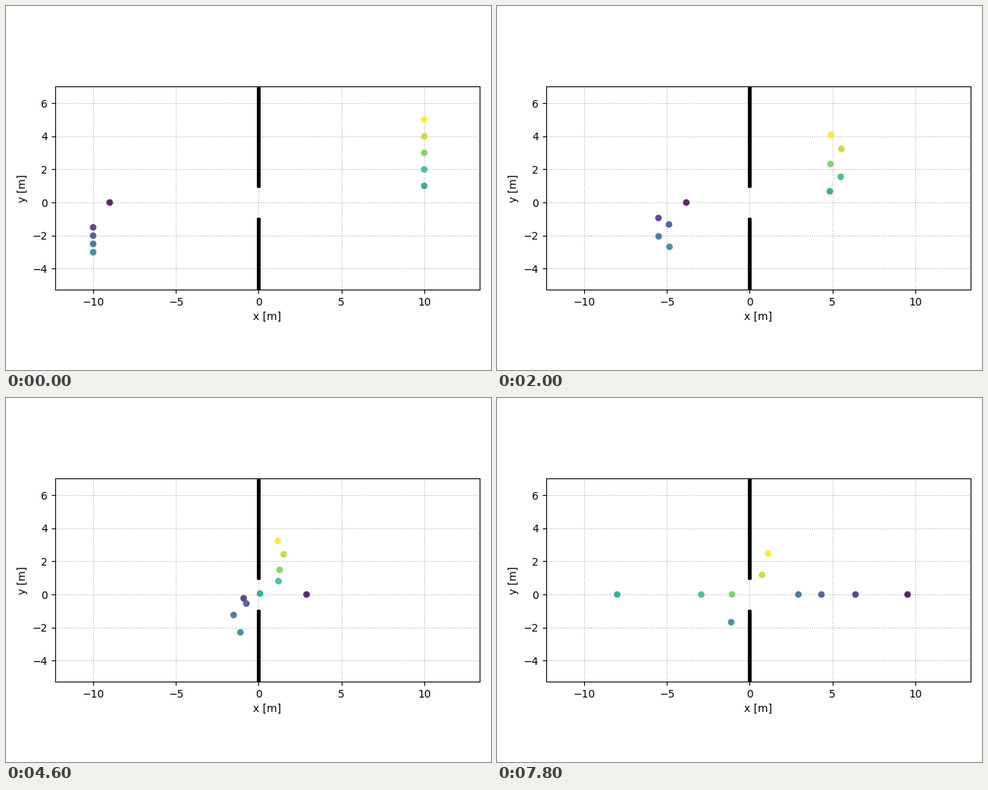
Animation, 640 px wide and 480 px high, one loop 8000 ms. Source, as a matplotlib script:

```python
import numpy as np
import matplotlib.pyplot as plt
from matplotlib.animation import FuncAnimation

FRAMES, INTERVAL = 40, 200
SPEED = 0.517     # metres per frame
TAU = 1.25        # relaxation time in frames
ARRIVAL = 19      # by then everybody queues at the gate
GOAL = 9.78

# For each pedestrian: place in the queue, place when set free, frame when set free
LEFT_QUEUE = [
    ((-1.25, -0.40), (-0.85, -0.20), 23.7),
    ((-1.17, -0.84), (-0.10, -0.10), 29.1),
    ((-1.81, -1.67), (-1.00, -0.50), 29.9),
    ((-1.10, -2.44), (-1.12, -1.67), 39),
]
RIGHT_QUEUE = [
    ((0.52, 0.41), (0.40, 0.30), 21.3),
    ((1.69, 1.17), (0.10, 0.00), 31.9),
    ((1.38, 1.86), (0.97, 0.50), 33.6),
    ((1.59, 2.56), (1.25, 2.00), 36),
    ((1.16, 3.42), (1.11, 2.47), 39),
]


def lag(t):
    return TAU * (1 - np.exp(-t / TAU))


def leader(n):
    """Walk straight to the goal, overshoot and turn back."""
    x = -9 + SPEED * n
    t = n - (GOAL + 9) / SPEED
    if t > 0:
        x = GOAL + SPEED * (2 * lag(t) - t)
    return np.array([x, 0.0])


def follower(n, start, slow, wait, hold, free):
    """Walk to the queue, creep towards the gate, then pass through it."""
    start, wait, hold = map(np.array, (start, wait, hold))
    if n < ARRIVAL:
        walked = SPEED * (n - lag(n) if slow else n)
        return start + (wait - start) * min(1, walked / np.hypot(*(wait - start)))
    if n < free:
        return wait + (hold - wait) * (n - ARRIVAL) / (free - ARRIVAL)
    walked = SPEED * (n - free - lag(n - free))
    rest = np.hypot(*hold) - walked
    if rest > 0:
        return hold * rest / np.hypot(*hold)
    return np.array([np.sign(start[0]) * rest, 0.0])


def positions(n):
    yield leader(n)
    for i, plan in enumerate(LEFT_QUEUE, 1):
        yield follower(n, (-10, -1 - i / 2), i % 2, *plan)
    for i, plan in enumerate(RIGHT_QUEUE):
        yield follower(n, (10, 1 + i), i % 2, *plan)


fig, ax = plt.subplots(figsize=(6.4, 4.8), dpi=100)
ax.set_aspect("equal")
ax.set_xlim(-12.305, 13.346)
ax.set_ylim(-5.25, 7.0)
ax.set_xticks(range(-10, 11, 5))
ax.set_yticks(range(-4, 7, 2))
ax.set_xlabel("x [m]")
ax.set_ylabel("y [m]")
ax.grid(linestyle="dotted")
ax.set_axisbelow(True)

for side in (-1, 1):
    wall = side * np.linspace(1, 10, 1000)
    ax.plot(np.zeros_like(wall), wall, "o", color="black", markersize=2.5)

colors = plt.get_cmap("viridis")(np.linspace(0, 1, 10))
dots = [ax.add_patch(plt.Circle((0, 0), 0.2, facecolor=c, edgecolor="none", alpha=0.85))
        for c in colors]
fig.tight_layout()


def update(n):
    for dot, pos in zip(dots, positions(n)):
        dot.center = pos
    return dots


anim = FuncAnimation(fig, update, frames=FRAMES, interval=INTERVAL,
                     init_func=lambda: update(0), repeat=True, repeat_delay=0)
plt.show()
```
